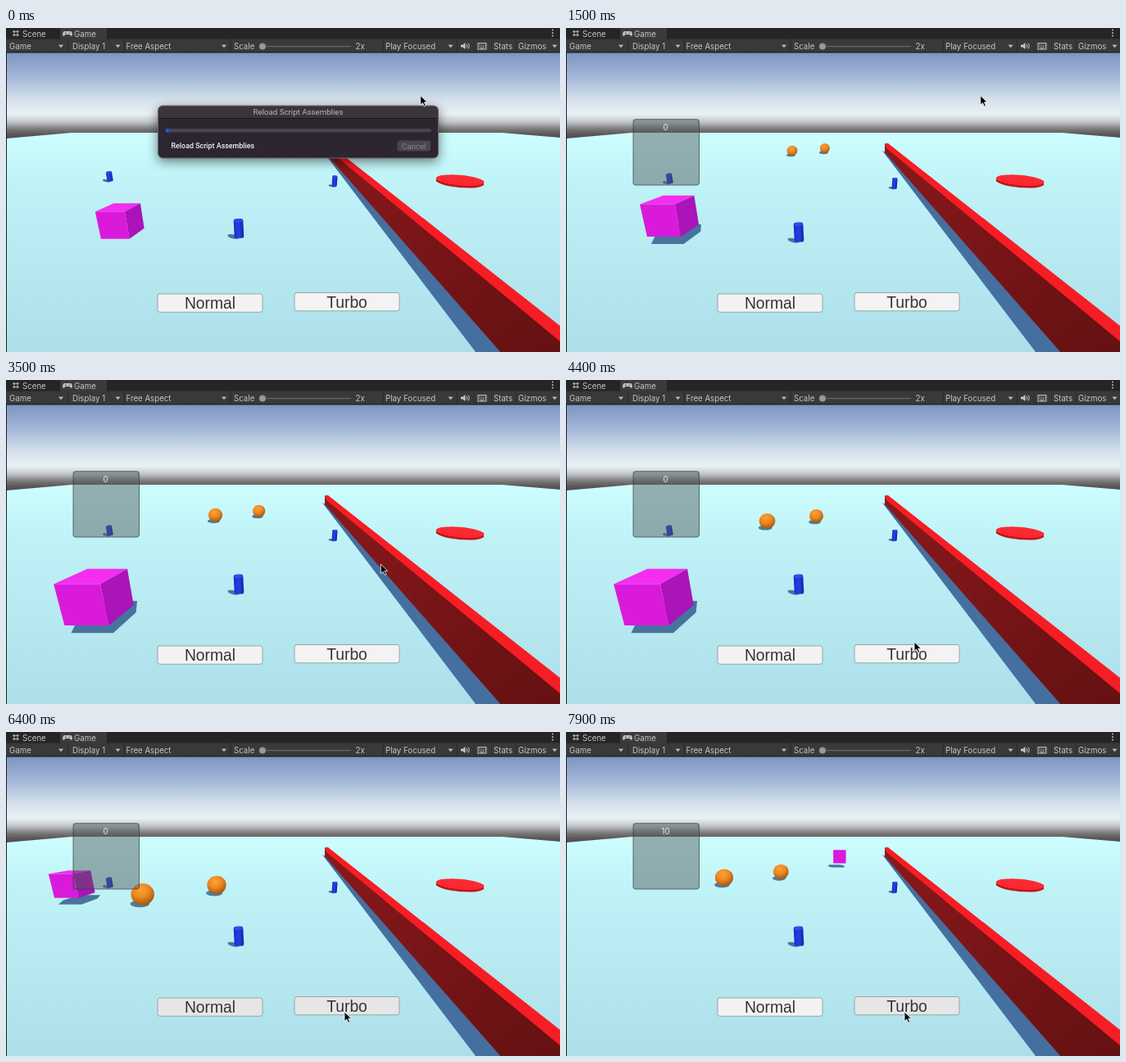
An HTML page for the animation above (8 s loop, 676 px wide and 396 px high).

```html
<!DOCTYPE html>
<html lang="en">
<head>
<meta charset="utf-8">
<title>Game view</title>
<style>
html, body { margin: 0; width: 100%; height: 100%; overflow: hidden; background: #222; }
svg { display: block; width: 676px; height: 396px; }
text { dominant-baseline: central; }
.ui { font: 9.7px Inter, sans-serif; fill: #c6c6c6; }
.btn { font: 19.3px "Liberation Sans", Arial, sans-serif; fill: #343434; text-anchor: middle; }
.dlg { font: 9.7px Roboto, sans-serif; }
.mid { text-anchor: middle; }
#dialog { filter: drop-shadow(0 4px 7px rgba(0,0,0,.5)); }
</style>
</head>
<body>
<svg viewBox="0 0 676 396" xmlns="http://www.w3.org/2000/svg">
  <defs>
    <linearGradient id="sky" gradientUnits="userSpaceOnUse" x1="0" y1="30" x2="0" y2="135">
      <stop offset="0" stop-color="#7c95c3"/><stop offset=".3" stop-color="#a6b9d8"/>
      <stop offset=".55" stop-color="#d5e1ec"/><stop offset=".72" stop-color="#e9f1f4"/>
      <stop offset=".81" stop-color="#bfc5c8"/><stop offset=".89" stop-color="#7c7a7c"/>
      <stop offset=".95" stop-color="#5d5656"/><stop offset="1" stop-color="#544d4d"/>
    </linearGradient>
    <linearGradient id="ground" gradientUnits="userSpaceOnUse" x1="0" y1="128" x2="0" y2="396">
      <stop offset="0" stop-color="#cdfeff"/><stop offset=".25" stop-color="#bff2f7"/>
      <stop offset="1" stop-color="#addfe9"/>
    </linearGradient>
    <linearGradient id="wall" gradientUnits="userSpaceOnUse" x1="390" y1="145" x2="640" y2="390">
      <stop offset="0" stop-color="#8a181b"/><stop offset="1" stop-color="#661214"/>
    </linearGradient>
    <linearGradient id="blue">
      <stop offset="0" stop-color="#1a2fc4"/><stop offset=".5" stop-color="#2340e6"/>
      <stop offset="1" stop-color="#1526a6"/>
    </linearGradient>
    <radialGradient id="orange" cx=".42" cy=".3" r=".72">
      <stop offset="0" stop-color="#ffa236"/><stop offset=".5" stop-color="#ec8720"/>
      <stop offset="1" stop-color="#9c5412"/>
    </radialGradient>
  </defs>

  <rect x="1" y="30" width="675" height="110" fill="url(#sky)"/>
  <path d="M1 135L80 128H605L676 134V396H1z" fill="url(#ground)"/>
  <path d="M386 150L390 152L603 396H573z" fill="#456f9f"/>
  <path d="M389 141L391 145L676 382V396H603L389 152z" fill="url(#wall)"/>
  <path d="M389 141L393 141L676 364V383L391 147z" fill="#f71d25"/>
  <g transform="rotate(5 554 187)">
    <ellipse cx="554" cy="188.5" rx="29.5" ry="6.5" fill="#c4151c"/>
    <ellipse cx="554" cy="186" rx="29.5" ry="6.2" fill="#fb2a32"/>
  </g>
  <g id="pickups"></g>
  <path id="cubeShade" fill="#48739d"/>
  <path id="cubeTop" fill="#f42df0"/>
  <path id="cubeSide" fill="#aa14b8"/>
  <path id="cubeFront" fill="#da1adb"/>
  <g id="balls"></g>
  <g id="panel">
    <rect x="82" y="111.7" width="80.5" height="80.3" rx="3" fill="rgba(76,84,86,.46)" stroke="rgba(50,60,62,.7)"/>
    <text id="score" class="ui mid" x="121.5" y="121" style="fill:#e6eeee"></text>
  </g>
  <g stroke="#98a6a8">
    <rect id="normal" x="185" y="325" width="128" height="22.3" rx="3"/>
    <rect id="turbo" x="352" y="323.5" width="128" height="22.3" rx="3"/>
  </g>
  <text class="btn" x="249" y="336.5">Normal</text>
  <text class="btn" x="416" y="335">Turbo</text>

  <g id="bar">
    <rect width="676" height="14" fill="#252525"/>
    <rect x="66" width="57" height="14" fill="#3a3a3a"/>
    <rect y="13.5" width="676" height="16" fill="#393939"/>
    <rect y="29.3" width="676" height="1.2" fill="#222"/>
    <rect y="30" width="1" height="366" fill="#222"/>
    <path d="M10 2.5v8M14 2.5v8M8 4.5h8M8 8.5h8" stroke="#b8b8b8" fill="none"/>
    <path d="M71.5 4h7q2.5 0 2.5 5q-1.500 2-3.500-1h-5q-2 3-3.500 1q0-5 2.500-5z" fill="#c0c0c0"/>
    <path d="M72 6.200h2M77 6.200h1" stroke="#3a3a3a"/>
    <g fill="#bbb"><circle cx="667" cy="2.500" r="1"/><circle cx="667" cy="6" r="1"/><circle cx="667" cy="9.500" r="1"/></g>
    <path d="M313 22.500H421" stroke="#626262" stroke-width="1.500"/>
    <circle cx="313" cy="22.500" r="4" fill="#979797"/>
    <path d="M555 20.500h2.500l3-2.500v8l-3-2.500h-2.500z" fill="#c6c6c6"/>
    <path d="M562 20q1.500 2 0 4M564 18.500q2.500 3.500 0 7" fill="none" stroke="#c6c6c6"/>
    <rect x="576" y="18.500" width="10" height="7.500" fill="none" stroke="#c6c6c6"/>
    <path d="M577.500 20.800h8M577.500 22.800h8" stroke="#c6c6c6" stroke-dasharray="1.200 1"/>
    <path d="M578.500 24.700h5" stroke="#c6c6c6"/>
  </g>

  <g id="dialog">
    <rect x="185.500" y="95" width="342" height="64" rx="6" fill="#2d2630"/>
    <path d="M185.500 110.500V101q0-6 6-6H521.500q6 0 6 6V110.500z" fill="#3a353b"/>
    <path d="M186 110.500H527" stroke="#1d181f"/>
    <rect x="185.500" y="95" width="342" height="64" rx="6" fill="none" stroke="#6b686c"/>
    <rect x="195" y="123" width="324" height="4.500" rx="2.200" fill="#49434c"/>
    <rect x="194.500" y="122.800" width="4.500" height="5" rx="2" fill="#1857dc"/>
    <rect x="477.500" y="137.500" width="40.500" height="13" rx="3" fill="#4b464d"/>
    <text class="dlg mid" x="356.500" y="102" fill="#b9b6ba">Reload Script Assemblies</text>
    <text class="dlg" x="201.500" y="144" fill="#f4f2f5" style="font-size:8.900px;font-weight:500">Reload Script Assemblies</text>
    <text class="dlg mid" x="497.700" y="144" fill="#89848b">Cancel</text>
  </g>
  <path id="cursor" d="M0 0V11.500L2.700 9L4.700 13.300L6.600 12.400L4.700 8.300H8.300z" fill="#000" stroke="#fff" stroke-width=".8"/>
</svg>
<script>
const LOOP = 8000, STEP = 100;
const $ = id => document.getElementById(id);

function add(parent, tag, attrs, text) {
  const el = document.createElementNS("http://www.w3.org/2000/svg", tag);
  for (const k in attrs) el.setAttribute(k, attrs[k]);
  if (text) el.textContent = text;
  parent.appendChild(el);
  return el;
}
function set(el, attrs) { for (const k in attrs) el.setAttribute(k, attrs[k]); }

// Rows are [time, ...values], joined linearly.
function at(rows, t) {
  if (t <= rows[0][0]) return rows[0].slice(1);
  for (let i = 1; i < rows.length; i++) {
    const a = rows[i - 1], b = rows[i];
    if (t <= b[0]) {
      const k = (t - a[0]) / (b[0] - a[0]);
      return a.slice(1).map((v, j) => v + (b[j + 1] - v) * k);
    }
  }
  return rows[rows.length - 1].slice(1);
}

// Toolbar labels, arrows and dividers
[["Scene", 20, 7], ["Game", 83, 7], ["Game", 4, 22], ["Display 1", 81, 22],
 ["Free Aspect", 146.5, 22], ["Scale", 278, 22], ["2x", 426.5, 22],
 ["Play Focused", 463, 22], ["Stats", 595, 22], ["Gizmos", 625, 22]
].forEach(([s, x, y]) => add($("bar"), "text", { class: "ui", x, y }, s));
[67, 136.5, 266, 542.5, 669.5].forEach(x =>
  add($("bar"), "path", { d: `M${x - 3} 20.500h6l-3 3.800z`, fill: "#b8b8b8" }));
[75, 143.5, 273.5, 460, 549.5, 570.5, 592, 622].forEach(x =>
  add($("bar"), "rect", { x, y: 14, width: 1, height: 15.5, fill: "#2b2b2b" }));

// Pickups: centre, half width, half height, lean, drop
const pickups = [[126.3, 181.5, 3.6, 6.3, -10, 2.5], [401, 187.2, 3.1, 6.9, 4, 2.7], [284, 245, 5.8, 12, -3, 4.7]]
  .map(([x, y, w, h, lean, drop]) => {
    const g = add($("pickups"), "g", {});
    add(g, "ellipse", { cx: -w * .7, cy: h * .92, rx: w * 1.3, ry: w * .45, fill: "#4a769f", transform: "rotate(12)" });
    const body = add(g, "g", { transform: `rotate(${lean})` });
    add(body, "rect", { x: -w, y: -h, width: 2 * w, height: 2 * h, rx: w * .6, ry: w * .4, fill: "url(#blue)" });
    add(body, "ellipse", { cx: 0, cy: -h + w * .4, rx: w * .95, ry: w * .4, fill: "#2a4bee" });
    return { g, x, y, drop };
  });

// Rolling balls: time, x, y, radius
const balls = [
  [[100, 288, 140, 5], [800, 282, 145, 5.7], [2300, 269, 155.5, 6.8], [4400, 245.5, 172.3, 9.4],
   [5400, 230, 185, 11.2], [6400, 166.7, 198.3, 13.2], [7400, 173, 184, 11.4], [7900, 193, 177.8, 10.4]],
  [[100, 320, 139, 5], [800, 318.3, 142.7, 5.5], [2300, 313, 152, 6.4], [4400, 305.5, 166.2, 8.3],
   [5400, 301.7, 176.3, 9.8], [6400, 257, 187, 11.2], [7400, 258, 175.500, 9.8], [7900, 262.3, 170.8, 9.1]]
].map(rows => ({
  rows,
  shade: add($("balls"), "ellipse", { fill: "#4f7ca0" }),
  ball: add($("balls"), "ellipse", { fill: "url(#orange)" })
}));

// Cube in camera space: time, left, depth of the top below the eye, distance
const cube = [[0, -6.36, 2.73, 8.37], [100, -6.36, 2.73, 8.37], [500, -5.89, 2.1, 7.73], [800, -5.89, 2.1, 7.73],
  [2300, -5.7, 2.1, 6.41], [3500, -4.91, 2.15, 5.17], [4400, -4.91, 2.15, 5.17], [4800, -6.3, 2.15, 5.17],
  [5400, -6.3, 2.15, 5.17], [6400, -9.54, 1.65, 10.52], [7400, -2.8, 1.5, 18.3], [7900, -.77, 1.42, 20.86]];
const pointer = [[2900, 505.7, 82.5], [3900, 425, 320], [4400, 425, 320], [4700, 413, 342]];

const SIN = Math.sin(16 * Math.PI / 180), COS = Math.cos(16 * Math.PI / 180);
function project([x, d, z]) {
  const depth = z * COS + d * SIN;
  return [338 + 317 * x / depth, 213 + 317 * (d * COS - z * SIN) / depth];
}
const poly = pts => "M" + pts.map(p => p.map(v => v.toFixed(2)).join(" ")).join("L") + "z";
const face = pts => poly(pts.map(project));

function hull(pts) {
  pts.sort((a, b) => a[0] - b[0] || a[1] - b[1]);
  const half = list => {
    const out = [];
    for (const p of list) {
      for (let n = out.length; n > 1; n--) {
        const a = out[n - 2], b = out[n - 1];
        if ((b[0] - a[0]) * (p[1] - a[1]) - (b[1] - a[1]) * (p[0] - a[0]) > 0) break;
        out.pop();
      }
      out.push(p);
    }
    return out.slice(0, -1);
  };
  return half(pts).concat(half(pts.slice().reverse()));
}

function drawCube(t) {
  const [x, d, z] = at(cube, t), X = x + 1, D = d + 1, Z = z + 1, hover = .35;
  $("cubeTop").setAttribute("d", face([[x, d, z], [X, d, z], [X, d, Z], [x, d, Z]]));
  $("cubeFront").setAttribute("d", face([[x, d, z], [X, d, z], [X, D, z], [x, D, z]]));
  $("cubeSide").setAttribute("d", X < 0 ? face([[X, d, z], [X, d, Z], [X, D, Z], [X, D, z]]) : "");
  const shade = [];
  for (const h of [hover, hover + 1])
    for (const cx of [x, X])
      for (const cz of [z, Z]) shade.push(project([cx - .35 * h, D + hover, cz + .7 * h]));
  $("cubeShade").setAttribute("d", t < 100 ? "" : poly(hull(shade)));
}

function draw(t) {
  const [drop] = at([[900, 0], [1200, 1]], t);
  pickups.forEach(p => p.g.setAttribute("transform", `translate(${p.x} ${p.y + p.drop * drop})`));
  const taken = t >= 6600;
  pickups[0].g.style.display = taken ? "none" : "";
  $("score").textContent = taken ? "10" : "0";
  $("panel").style.display = t < 100 ? "none" : "";
  $("dialog").style.display = t < 100 ? "" : "none";

  drawCube(t);
  for (const b of balls) {
    const [x, y, r] = at(b.rows, t), wide = 1 + Math.abs(x - 338) / 2200;
    set(b.ball, { cx: x, cy: y, rx: r * wide, ry: r });
    set(b.shade, { cx: x - r * .25, cy: y + r * .88, rx: r * .9, ry: r * .32 });
  }

  const grey = rows => { const [v] = at(rows, t); return `rgb(${v},${v},${v})`; };
  $("normal").setAttribute("fill", grey([[4500, 243], [4700, 230], [6900, 230], [7000, 243]]));
  $("turbo").setAttribute("fill", grey([[4500, 243], [4700, 230]]));
  $("cursor").setAttribute("transform", `translate(${at(pointer, t).join(" ")})`);
}

const start = performance.now();
function tick() {
  const t = Math.max(0, performance.now() - start) % LOOP;
  draw(Math.floor(t / STEP) * STEP);
  requestAnimationFrame(tick);
}
tick();
</script>
</body>
</html>
```
